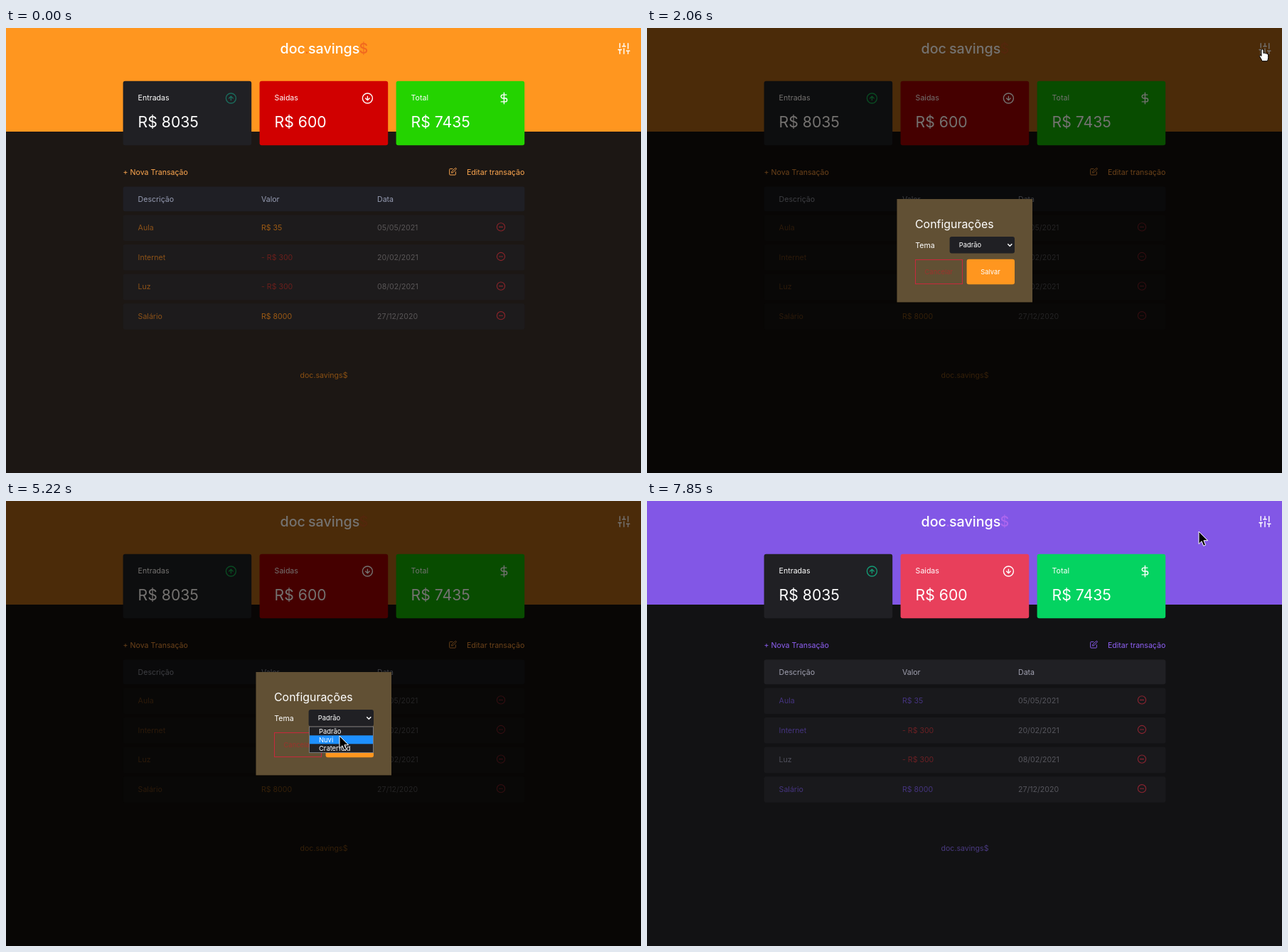
Write an HTML page that moves like this. It is 893x627 px and loops after 8 s.

```html
<!DOCTYPE html>
<html lang="pt-BR">
<head>
<meta charset="utf-8">
<title>Finanças</title>
<style>
html, body { margin: 0; width: 100%; height: 100%; overflow: hidden; background: #000; }
svg { display: block; width: 893px; height: 627px; }
text { font-family: Inter, "Noto Sans", sans-serif; font-size: 10.59px; white-space: pre; }
.big { font-size: 21.2px; }
.small { font-size: 9.4px; }
.logo { font-size: 19.7px; font-weight: 500; }
.icon { fill: none; stroke-width: 2; stroke-linecap: round; stroke-linejoin: round; }
.amber {
  --bg: #1c1714; --top: #ff961f; --card: #202024; --out: #d10000; --total: #24d300;
  --text: #fff; --mark: #f2691f; --up: #1b6b5c; --link: #ffa850; --thead: #1f1f25; --row: #1d1b1c;
  --label: #969cb3; --item: #8c5218; --plus: #9c5a14; --minus: #6b1f1c; --date: #595657;
  --remove: #8a242a; --foot: #8a5013; --hot: #1d1b1c; --hotItem: #8c5218; --hotMinus: #6b1f1c; --hotDate: #595657;
}
.dim {
  --bg: #080605; --top: #4b2b09; --card: #0d0e0f; --out: #450000; --total: #084c00;
  --text: #747270; --mark: #54270c; --up: #0a4a22; --link: #6b421a; --thead: #0a0a0b; --row: #090807;
  --label: #3e3f43; --item: #2c1a0a; --plus: #352009; --minus: #240a09; --date: #242324;
  --remove: #330e11; --foot: #352009; --hot: #090807; --hotItem: #2c1a0a; --hotMinus: #240a09; --hotDate: #242324;
}
.violet {
  --bg: #121214; --top: #8257e6; --card: #202024; --out: #e83f5b; --total: #04d361;
  --text: #fff; --mark: #ac66ee; --up: #149a74; --link: #8f60f5; --thead: #202024; --row: #19191c;
  --label: #a0a0b0; --item: #45347f; --plus: #45347f; --minus: #6b2024; --date: #56565d;
  --remove: #8c2431; --foot: #4a3a80; --hot: #19191c; --hotItem: #50505c; --hotMinus: #6b2024; --hotDate: #56565d;
}
.violet.over { --hot: #202024; --hotItem: #8257e6; --hotMinus: #d13a42; --hotDate: #a0a0b0; }
</style>
</head>
<body>
<svg id="stage" viewBox="0 0 893 627" xmlns="http://www.w3.org/2000/svg"></svg>
<script>
const LOOP = 8000;
const stage = document.getElementById('stage');

const color = c => c[0] === '#' ? c : `var(--${c})`;
const rect = (x, y, w, h, c, r = 0, extra = '') =>
  `<rect x="${x}" y="${y}" width="${w}" height="${h}" rx="${r}" fill="${color(c)}" ${extra}/>`;
const text = (x, y, s, c, cls = '', extra = '') =>
  `<text x="${x}" y="${y}" class="${cls}" fill="${color(c)}" ${extra}>${s}</text>`;
// 24-unit icon centred on a point
const icon = (cx, cy, d, c, sx, sy = sx) =>
  `<path class="icon" stroke="${color(c)}" d="${d}" transform="translate(${cx} ${cy}) scale(${sx} ${sy}) translate(-12 -12)"/>`;
const mid = 'text-anchor="middle"';

const ring = 'M2 12a10 10 0 1 0 20 0a10 10 0 1 0-20 0';
const icons = {
  up: ring + 'M16 12l-4-4-4 4M12 16V8',
  down: ring + 'M8 12l4 4 4-4M12 8v8',
  dollar: 'M12 1v22M17 5H9.5a3.5 3.5 0 0 0 0 7h5a3.5 3.5 0 0 1 0 7H6',
  sliders: 'M4 21v-7M4 10V3M12 21v-9M12 8V3M20 21v-5M20 12V3M1 14h6M9 8h6M17 16h6',
  edit: 'M11 4H4a2 2 0 0 0-2 2v14a2 2 0 0 0 2 2h14a2 2 0 0 0 2-2v-7M18.5 2.5a2.1 2.1 0 0 1 3 3L12 15l-4 1 1-4z',
  remove: ring + 'M7.5 12h9'
};

const cards = [
  ['Entradas', 'R$ 8035', 'card', 'up', 'up'],
  ['Saidas', 'R$ 600', 'out', 'down', 'text'],
  ['Total', 'R$ 7435', 'total', 'dollar', 'text']
];
const rows = [
  ['Aula', 'R$ 35', '05/05/2021'],
  ['Internet', '- R$ 300', '20/02/2021'],
  ['Luz', '- R$ 300', '08/02/2021'],
  ['Salário', 'R$ 8000', '27/12/2020']
];
const themes = ['Padrão', 'Nuvi', 'Craterfold'];

function card([name, value, fill, sign, tint], i) {
  const x = 164.6 + i * 192;
  return rect(x, 74.8, 180.6, 90.4, fill, 3) + text(x + 21, 102.4, name, 'text') +
    text(x + 21, 140.4, value, 'text', 'big') + icon(x + 151.8, 99, icons[sign], tint, .7);
}

function row([name, value, date], i) {
  const y = 263.4 + i * 41.6, hot = i === 2, neg = value[0] === '-';
  const amount = neg ? (hot ? 'hotMinus' : 'minus') : 'plus';
  return rect(164.6, y, 564.8, 36.6, hot ? 'hot' : 'row', 3) +
    text(185.6, y + 21.8, name, hot ? 'hotItem' : 'item') +
    text(359, y + 21.8, value, amount) +
    text(522, y + 21.8, date, hot ? 'hotDate' : 'date') +
    icon(696, y + 17, icons.remove, 'remove', .56);
}

const page = rect(0, 0, 893, 627, 'bg') + rect(0, 0, 893, 146, 'top') +
  text(385.5, 35.6, 'doc', 'text', 'logo') + text(420, 35.6, '.', 'mark', 'logo') +
  text(425, 35.6, 'savings', 'text', 'logo') + text(496.5, 35.6, '$', 'mark', 'logo') +
  icon(869, 29, icons.sliders, 'text', .72, .8) +
  cards.map(card).join('') +
  text(164.6, 207.3, '+ Nova Transação', 'link') +
  text(729.3, 207.3, 'Editar transação', 'link', '', 'text-anchor="end"') +
  icon(628.5, 202.2, icons.edit, 'link', .48) +
  rect(164.6, 223.5, 564.8, 34.7, 'thead', 3) +
  [[185.6, 'Descrição'], [359, 'Valor'], [522, 'Data']].map(([x, s]) => text(x, 244.7, s, 'label')).join('') +
  rows.map(row).join('') +
  text(447, 493, 'doc.savings$', 'foot', '', mid);

const modal = rect(351.5, 241, 190.5, 145.4, '#615034') +
  text(377, 282, 'Configurações', '#fff', '', 'style="font-size:15.9px"') +
  text(377.3, 309.7, 'Tema', '#fff') +
  rect(425.6, 294, 91.4, 23.6, '#202024', 3) +
  text(438.8, 309, '', '#fff', 'small', 'id="choice"') +
  '<path d="M507.3 304.3l3 3 3-3" fill="none" stroke="#fff" stroke-width="1.5"/>' +
  rect(377.5, 326.5, 66, 34, 'none', 0, 'style="fill:none" stroke="#c8283c"') +
  text(410.3, 347.2, 'Cancelar', '#9c332d', 'small', mid) +
  rect(449.6, 325.8, 67.4, 35.4, '#ff961f', 3, 'id="save"') +
  text(483, 347.2, 'Salvar', '#fff', 'small', mid);

const list = rect(426.5, 318, 90, 36.5, '#202024', 0, 'stroke="#77777c"') +
  rect(427, 318.5, 89, 12, '#1e90ff', 0, 'id="pick"') +
  themes.map((s, i) => text(440, 327.5 + i * 12, s, '#fff', 'small')).join('');

const arrow = 'M0 0V17.5L4 13.7L6.7 20.3L9.6 19L6.9 12.7H12.6Z';
const hand = 'M-1.5 1.4Q0-.8 1.5 1.4V6Q3.2 5 4 6.4Q5.6 5.6 6.2 7Q8 6.5 8.2 8.5V12Q8.2 14.6 6.8 17.2H-.6Q-1 15-2.8 12.6Q-4.8 10-3.8 9Q-2.8 8.4-1.5 10Z';

stage.innerHTML = page + `<g id="modal">${modal}<g id="list">${list}</g></g>
  <path id="cursor" stroke-width="1" stroke-linejoin="round"/>`;
const [box, menu, pick, save, choice, cursor] =
  ['modal', 'list', 'pick', 'save', 'choice', 'cursor'].map(id => document.getElementById(id));

// time, x, y, ease into this point
const path = [
  [260, 870, 618], [330, 870, 618], [520, 880, 606], [590, 812, 470], [650, 752, 375], [720, 738, 403],
  [920, 738, 403], [1660, 865.5, 29.5, 1], [2540, 865.5, 29.5], [3180, 433, 342, 1], [3350, 454, 352],
  [3420, 456, 352], [3890, 501, 302, 1], [4160, 507, 304], [4760, 507, 304], [5220, 469, 331, 1],
  [5490, 464, 333], [6580, 464, 333], [6950, 484, 356, 1], [7110, 482, 351], [7520, 482, 351],
  [7720, 745, 105], [7780, 797, 60], [7850, 776, 43]
];

function locate(t) {
  const n = path.findIndex(p => p[0] > t);
  if (n < 1) return path[n ? path.length - 1 : 0].slice(1, 3);
  const [t0, x0, y0] = path[n - 1], [t1, x1, y1, ease] = path[n];
  let k = (t - t0) / (t1 - t0);
  if (ease) k = k * k * (3 - 2 * k);
  return [x0 + (x1 - x0) * k, y0 + (y1 - y0) * k];
}

const inside = (x, y, l, t, r, b) => x >= l && x <= r && y >= t && y <= b;
const show = (el, on) => el.setAttribute('display', on ? 'inline' : 'none');

function draw(t) {
  const [x, y] = locate(t);
  const open = t >= 2060 && t < 7380, dropped = t >= 4430 && t < 5760;
  const onSave = open && !dropped && inside(x, y, 449, 325, 517, 361);
  const onField = open && !dropped &&
    (inside(x, y, 425, 294, 517, 318) || inside(x, y, 377, 326, 444, 361));
  const pointing = onSave || onField || inside(x, y, 860, 21, 878, 38);

  stage.setAttribute('class', open ? 'dim' : t < 2060 ? 'amber' : t < 7580 ? 'violet over' : 'violet');
  show(box, open);
  show(menu, dropped);
  pick.setAttribute('y', y >= 330 ? 330.3 : 318.5);
  save.setAttribute('fill', onSave ? '#f5ab5a' : '#ff961f');
  choice.textContent = themes[t < 5760 ? 0 : 1];

  show(cursor, t >= 520 || (t >= 260 && t < 330));
  cursor.setAttribute('d', pointing ? hand : arrow);
  cursor.setAttribute('fill', pointing ? '#fff' : '#000');
  cursor.setAttribute('stroke', pointing ? '#000' : '#fff');
  cursor.setAttribute('transform', `translate(${x.toFixed(2)} ${y.toFixed(2)})`);
}

const start = performance.now();
function tick() {
  draw((performance.now() - start) % LOOP);
  requestAnimationFrame(tick);
}
tick();
</script>
</body>
</html>
```
